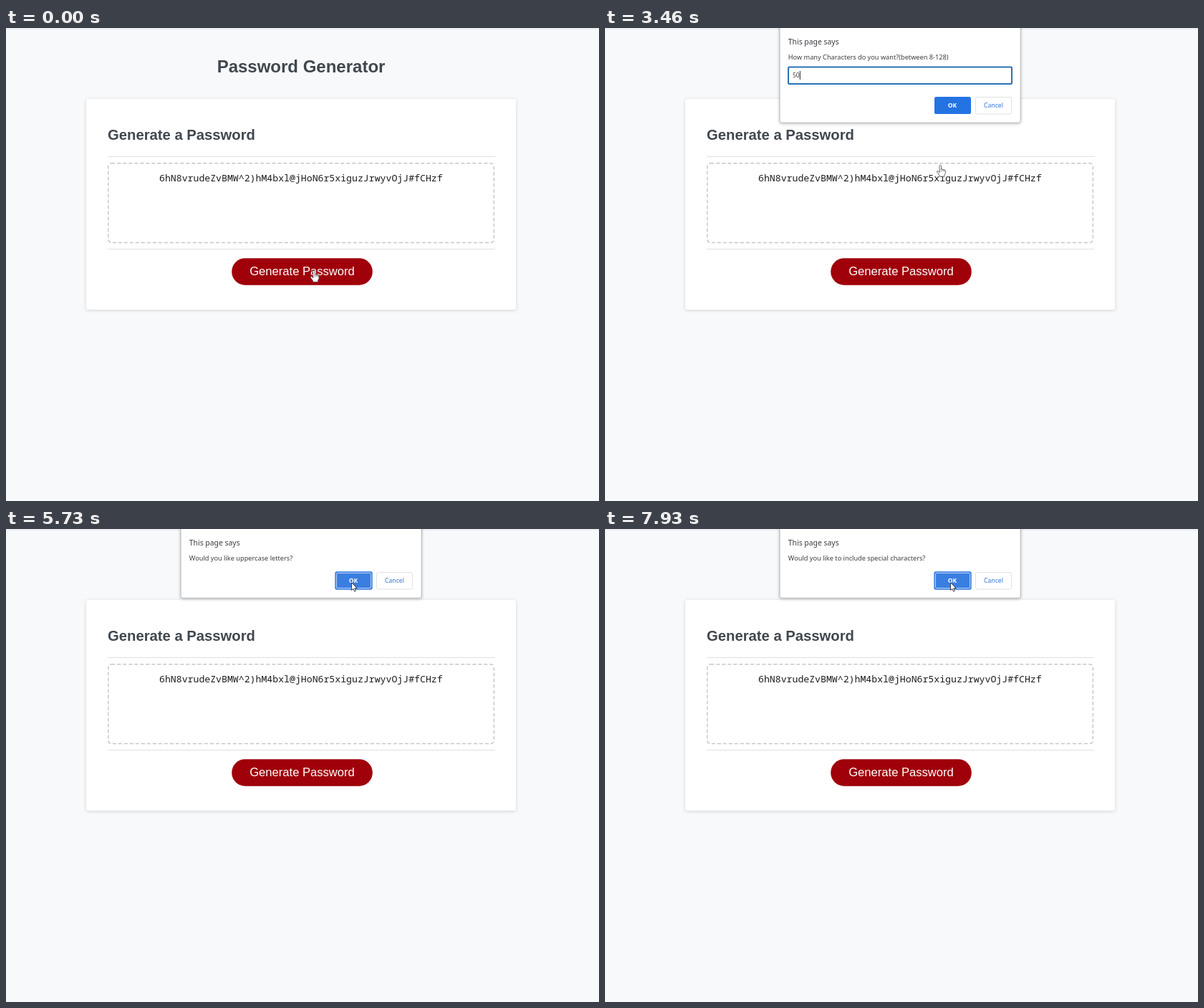
These frames come from a looping animation (828x660 px, 8 s). An HTML page:

```html
<!DOCTYPE html>
<html lang="en">
<head>
<meta charset="utf-8">
<title>Password Generator</title>
<style>
  html, body { margin: 0; width: 100%; height: 100%; overflow: hidden; background: #f8f9fb; }
  svg { display: block; width: 828px; height: 660px; }
  text { white-space: pre; }
  .page { font-family: "Liberation Sans", Arial, sans-serif; fill: #40474e; }
  .mono { font: 13.2px "Noto Sans Mono", monospace; fill: #1c1c1c; }
  .ui { font-family: "Noto Sans", "Open Sans", sans-serif; fill: #3a3d41; }
  .card { filter: drop-shadow(0 1.5px 2.5px rgba(0, 0, 0, .15)); }
  .panel { filter: drop-shadow(0 1.5px 2px rgba(0, 0, 0, .24)); }
</style>
</head>
<body>
<svg viewBox="0 0 828 660">
  <rect width="828" height="660" fill="#f8f9fb"/>
  <rect y=".7" width="828" height="1" fill="#dfe1e5"/>
  <g class="page">
    <text x="412" y="62" font-size="24" font-weight="700" text-anchor="middle">Password Generator</text>
    <rect class="card" x="112" y="99" width="600" height="294" rx="3.5" fill="#fff"/>
    <text x="142" y="156" font-size="20.25" font-weight="700">Generate a Password</text>
    <path d="M142 179.5H683M142 308.5H683" stroke="#e0e1e3"/>
    <rect x="142.8" y="188.7" width="538.5" height="110.8" rx="4.5" fill="none"
      stroke="#c6c6c6" stroke-width="1.4" stroke-dasharray="5 3"/>
    <text class="mono" x="214" y="214">6hN8vrudeZvBMW^2)hM4bxl@jHoN6r5xiguzJrwyvOjJ#fCHzf</text>
    <rect x="315.2" y="321.2" width="196.6" height="37.5" rx="18.7" fill="#9f000a"/>
    <text x="413.5" y="345" font-size="16.6" text-anchor="middle" fill="#fff">Generate Password</text>
  </g>
  <g id="dialogs" class="ui"></g>
  <g id="pointer" stroke-linejoin="round" stroke-linecap="round">
    <g id="hand">
      <path d="M-1.3 1.2Q0-1 1.3 1.2V6.2Q2.5 5.4 3.4 6.7Q4.6 6 5.3 7.3Q6.8 6.9 7 8.6V11.5L5.6 14.2V16.3H-1.5V14.6L-4.7 10.2Q-5.3 8.5-3.6 8.5L-1.3 10.4Z"
        fill="#fff" stroke="#555" stroke-width=".9"/>
      <path d="M1.3 6.2V9M3.4 6.7V9M5.3 7.3V9.2" fill="none" stroke="#666" stroke-width=".7"/>
    </g>
    <path id="arrow" d="M0 0V10.5L2.4 8.4L4.1 12.2L5.9 11.4L4.2 7.8H7.4Z" fill="#fff" stroke="#222" stroke-width=".8"/>
  </g>
</svg>
<script>
const LOOP = 8000, FADE = 200, BLINK = 500;
const $ = id => document.getElementById(id);

const dialogs = [
  { at: 800, ask: "How many Characters do you want?(between 8-128)", prompt: true },
  { at: 4000, ask: "Would you like lowercase letters?" },
  { at: 5250, ask: "Would you like uppercase letters?" },
  { at: 6300, ask: "Would you like to include numbers?" },
  { at: 7200, ask: "Would you like to include special characters?" }
];
const keys = [{ at: 2260, text: "5" }, { at: 2400, text: "50" }];

// Pointer stops: time, x, y
const stops = [
  [0, 430, 338], [800, 430, 338], [1180, 457, 242], [2000, 457, 242],
  [2400, 463, 212], [3300, 463, 212], [3850, 489, 110], [4150, 489, 110], [4700, 482.5, 75]
];

function dialogMarkup({ ask, prompt }) {
  const top = prompt ? 96 : 60;
  const field = `
    <rect x="256" y="54.5" width="312" height="23.5" rx="1.5" fill="#fff" stroke="#2a70b4" stroke-width="2"/>
    <text id="typed" x="262" y="69" font-size="8.4"></text>
    <rect id="caret" y="60" width="1" height="12" fill="#222"/>`;
  const ring = `<rect x="461.4" y="${top + 1.4}" width="48.2" height="21.2" rx="1.8"
    fill="none" stroke="#d3e2f9" stroke-width=".9"/>`;
  const grow = prompt ? 0 : .7;
  return `
    <rect class="panel" x="244" y="-30" width="336.2" height="${top + 66.3}" rx="2.5"
      fill="#fff" stroke="#b0b2b5" stroke-width=".9"/>
    <text x="255.8" y="23.3" font-size="10.4">This page says</text>
    <text x="255.8" y="44.2" font-size="9.2">${ask}</text>
    ${prompt ? field : ""}
    <rect class="ok" x="${460 - grow}" y="${top - grow}" width="${51 + 2 * grow}" height="${24 + 2 * grow}" rx="2.6"/>
    ${prompt ? "" : ring}
    <text x="485" y="${top + 15}" font-size="8.5" font-weight="600" text-anchor="middle" fill="#fff">OK</text>
    <rect x="517.5" y="${top + .5}" width="50" height="23.5" rx="2.5" fill="#fff" stroke="#dfe1e4"/>
    <text x="542.5" y="${top + 15}" font-size="8.6" font-weight="500" text-anchor="middle" fill="#2f73d8">Cancel</text>`;
}

for (const d of dialogs) {
  d.node = document.createElementNS("http://www.w3.org/2000/svg", "g");
  d.node.innerHTML = dialogMarkup(d);
  d.ok = d.node.querySelector(".ok");
  d.top = d.prompt ? 96 : 60;
  $("dialogs").append(d.node);
}

const clamp = v => Math.min(1, Math.max(0, v));
const smooth = p => p * p * (3 - 2 * p);
const show = (node, on) => node.setAttribute("visibility", on ? "inherit" : "hidden");

function pointerAt(t) {
  const i = stops.findIndex(s => s[0] > t);
  if (i < 0) return stops.at(-1).slice(1);
  const [a, b] = [stops[i - 1], stops[i]];
  const p = smooth((t - a[0]) / (b[0] - a[0]));
  return [a[1] + (b[1] - a[1]) * p, a[2] + (b[2] - a[2]) * p];
}

function drawDialogs(t, x, y) {
  dialogs.forEach((d, i) => {
    const end = dialogs[i + 1]?.at ?? Infinity;
    const live = t >= d.at && t < end + FADE;
    show(d.node, live);
    if (!live) return;
    const p = 1 - clamp((t - d.at) / FADE);
    const q = clamp((t - end) / FADE);
    const opacity = t < end ? 1 - p ** 3 : (1 - q) ** 2;
    d.node.setAttribute("opacity", opacity);
    d.node.setAttribute("transform", `translate(0 ${-18 * p * p - 16 * q})`);
    const hover = x > 460 && x < 511 && y > d.top && y < d.top + 24;
    d.ok.setAttribute("fill", hover ? "#3a7ee0" : "#2373e3");
  });
}

function drawField(t) {
  const key = keys.findLast(k => t >= k.at);
  const text = key ? key.text : "";
  const since = t - (key ? key.at : dialogs[0].at);
  $("typed").textContent = text;
  $("caret").setAttribute("x", 262 + text.length * 4.9);
  show($("caret"), Math.floor(since / BLINK) % 2 === 0 && t < dialogs[1].at);
}

function draw(t) {
  const [x, y] = pointerAt(t);
  const top = dialogs.findLast(d => t >= d.at);
  const over = !!top && y < top.top + 36.5;
  drawDialogs(t, x, y);
  drawField(t);
  $("pointer").setAttribute("transform", `translate(${x} ${y})`);
  show($("hand"), !over);
  show($("arrow"), over);
}

const start = performance.now();
function tick() {
  draw((performance.now() - start) % LOOP);
  requestAnimationFrame(tick);
}
tick();
</script>
</body>
</html>
```
